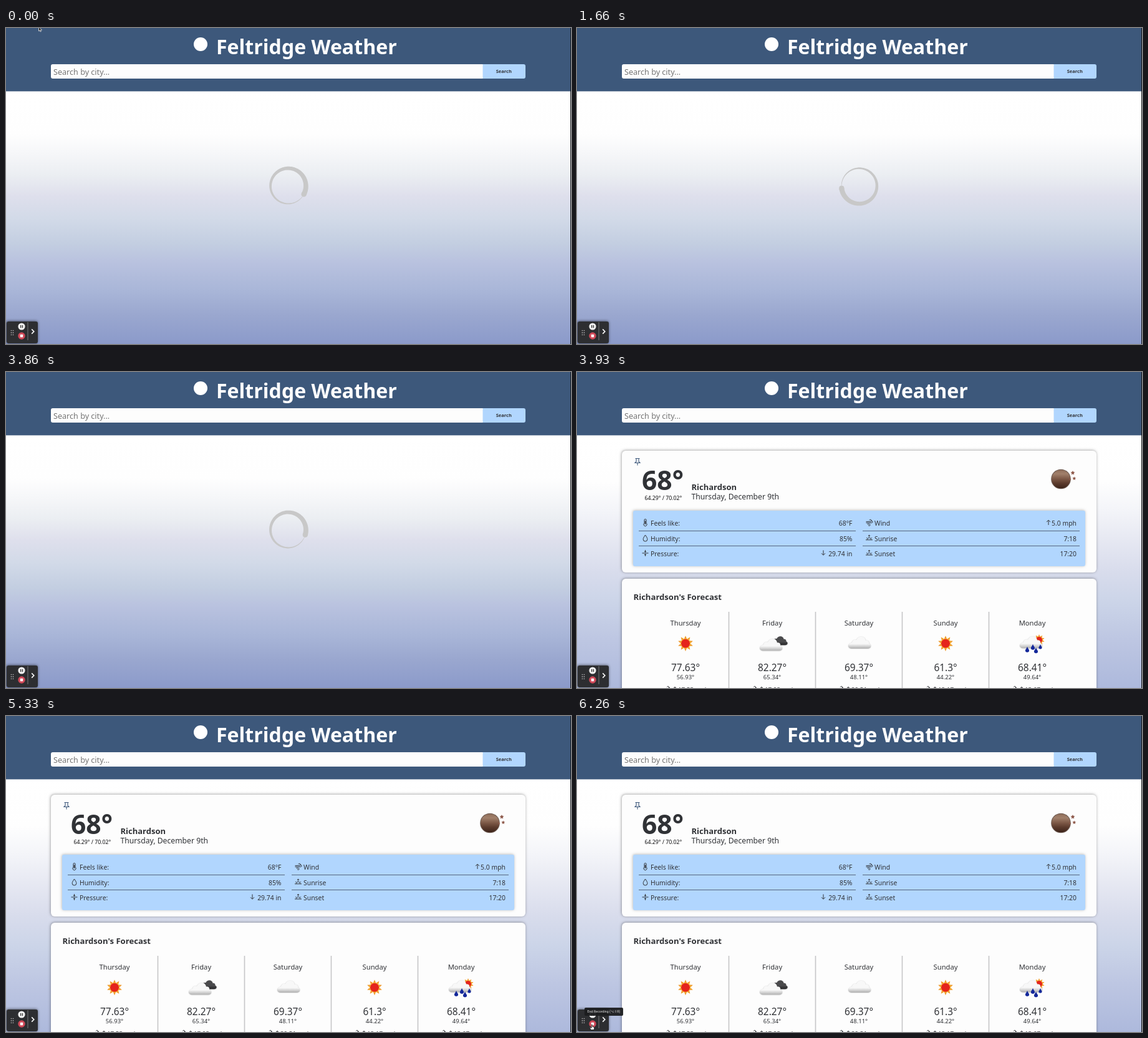
Animation, 906 px wide and 506 px high, one loop 6330 ms. Source, as an HTML page with a canvas:

```html
<!DOCTYPE html>
<html lang="en">
<head>
<meta charset="utf-8">
<title>Weather</title>
<style>
html, body { margin: 0; width: 100%; height: 100%; overflow: hidden; background: #fff; }
canvas { display: block; width: 906px; height: 506px; }
</style>
</head>
<body>
<canvas id="stage" width="906" height="506"></canvas>
<script>
const W = 906, H = 506, LOOP = 6330, FPS = 15, LOADED = 3930;
const c = document.getElementById('stage').getContext('2d');
const SANS = '"Noto Sans", "Open Sans", sans-serif';
const INK = '#303236', BLUE = '#b1d6fe', NAVY = '#3d587b';

function text(str, x, y, size, o = {}) {
  c.font = `${o.bold ? 'bold ' : ''}${size}px ${o.font || SANS}`;
  c.textAlign = o.align || 'left';
  c.fillStyle = o.color || INK;
  c.fillText(str, x, y);
}

function box(x, y, w, h, r, color, shadow) {
  c.save();
  if (shadow) {
    c.shadowColor = `rgba(0,0,0,${shadow})`;
    c.shadowBlur = 4;
    c.shadowOffsetX = -0.5;
    c.shadowOffsetY = -0.5;
  }
  c.fillStyle = color;
  c.beginPath();
  c.roundRect(x, y, w, h, r);
  c.fill();
  c.restore();
}

function disc(x, y, r, color) {
  c.fillStyle = color;
  c.beginPath();
  c.arc(x, y, r, 0, Math.PI * 2);
  c.fill();
}

// Star with n points, inner radius given as a share of r
function star(x, y, r, n, inner, color) {
  c.fillStyle = color;
  c.beginPath();
  for (let i = 0; i < 2 * n; i++) {
    const a = i * Math.PI / n, q = i % 2 ? r * inner : r;
    c.lineTo(x + q * Math.sin(a), y - q * Math.cos(a));
  }
  c.fill();
}

function stroke(d, x, y, color = INK, width = 1) {
  c.save();
  c.translate(x, y);
  c.strokeStyle = color;
  c.lineWidth = width;
  c.stroke(new Path2D(d));
  c.restore();
}

function fill(d, x, y, color, outline) {
  c.save();
  c.translate(x, y);
  const p = new Path2D(d);
  c.fillStyle = color;
  c.fill(p);
  if (outline) {
    c.strokeStyle = outline;
    c.lineWidth = 0.8;
    c.stroke(p);
  }
  c.restore();
}

function vertical(y0, y1, stops) {
  const g = c.createLinearGradient(0, y0, 0, y1);
  for (const [y, color] of stops) g.addColorStop((y - y0) / (y1 - y0), color);
  return g;
}

// Value at t on straight segments through [time, value] points
function track(t, pts) {
  if (t <= pts[0][0]) return pts[0][1];
  for (let i = 1; i < pts.length; i++) {
    const [t0, a] = pts[i - 1], [t1, b] = pts[i];
    if (t <= t1) return a + (b - a) * (t - t0) / (t1 - t0);
  }
  return pts[pts.length - 1][1];
}

const skyEmpty = [[101, '#ffffff'], [170, '#fefefe'], [200, '#f6f7f9'], [235, '#ebeef2'],
  [270, '#dedfec'], [305, '#d2dae8'], [345, '#c3cee1'], [375, '#b9c2df'],
  [420, '#a9b6d8'], [460, '#9aa7cf'], [506, '#8b9aca']];
const skyFull = [[101, '#ffffff'], [175, '#fefefe'], [220, '#f4f5f9'], [270, '#e6e8f2'],
  [320, '#d8dcec'], [370, '#cbd4e8'], [430, '#bdc6e2'], [506, '#adb9dc']];

function page(full) {
  c.fillStyle = vertical(101, H, full ? skyFull : skyEmpty);
  c.fillRect(0, 0, W, H);
  c.fillStyle = NAVY;
  c.fillRect(0, 0, W, 101.4);
  disc(312, 26, 11, '#fff');
  text('Feltridge Weather', 337, 41.5, 32.1, { bold: true, color: '#fff' });
  box(72, 58, 694, 23, [3, 0, 0, 3], '#fdfdfd');
  box(764.5, 58, 68.5, 23, [0, 3, 3, 0], BLUE);
  text('Search by city...', 76, 74.5, 12.6, { color: '#757575' });
  text('Search', 798.3, 72.4, 7.5, { bold: true, align: 'center' });
}

function spinner(deg) {
  const n = 120, R = 28.4, span = Math.PI * 1.96, head = deg * Math.PI / 180;
  const half = i => 0.3 + 3.8 * (1 - i / n);
  const at = (i, r) => c.lineTo(r * Math.cos(head - span * i / n), r * Math.sin(head - span * i / n));
  c.save();
  c.translate(452.5, 253);
  c.fillStyle = '#c8c8c8';
  c.beginPath();
  for (let i = 0; i <= n; i++) at(i, R + half(i));
  for (let i = n; i >= 0; i--) at(i, R - half(i));
  c.fill();
  disc(R * Math.cos(head), R * Math.sin(head), half(0), '#c8c8c8');
  c.restore();
}

function sun(x, y, r) {
  star(x, y, r, 10, 0.6, '#f09c2c');
  disc(x, y, r * 0.64, '#f7b83c');
  disc(x, y, r * 0.56, '#e5241c');
}

// Cloud centred on x, y with a width of 35 at scale 1
function cloud(x, y, s, light, dark) {
  c.save();
  c.translate(x, y);
  c.scale(s, s * 0.9);
  const p = new Path2D('M-13 10 C-20 9 -19 1 -12 0 C-12 -5 -7 -6 -5 -5 C-2 -13 9 -13 10 -4 C14 -5 16 -1 15 1 C20 3 19 10 13 10 Z');
  c.shadowColor = 'rgba(0,0,0,.35)';
  c.shadowBlur = 1.5;
  c.shadowOffsetY = 0.5;
  c.fillStyle = vertical(-11, 10, [[-11, light], [2, light], [10, dark]]);
  c.fill(p);
  c.restore();
}

const whiteCloud = (x, y, s = 1) => cloud(x, y, s, '#f8f8f8', '#b4b4b4');

function drop(x, y, s) {
  fill(`M0 ${-4 * s} C${s} ${-s} ${3 * s} 0 ${2.5 * s} ${2 * s} C${2 * s} ${4 * s} ${-2 * s} ${4 * s} ${-2.5 * s} ${2 * s} C${-3 * s} 0 ${-s} ${-s} 0 ${-4 * s}Z`, x, y, '#14289a');
}

const skies = {
  sun: x => sun(x, 434.7, 12.5),
  clouds(x) {
    cloud(x + 11, 430.5, 0.75, '#4a4a4c', '#242426');
    whiteCloud(x - 2, 437);
  },
  cloud: x => whiteCloud(x + 1, 433.5),
  rain(x) {
    sun(x + 11, 429, 9);
    whiteCloud(x - 2, 433);
    drop(x - 8, 444.5, 1.2);
    drop(x + 1, 440.5, 1.2);
    drop(x + 6, 446, 1.2);
    drop(x + 13, 440, 1);
  }
};

function moon() {
  disc(776, 171.5, 15.8, '#6d5a51');
  disc(776, 171.5, 14.8, vertical(156, 187, [[156, '#8d6c59'], [163, '#a1806b'], [171, '#7d5947'],
    [178, '#5c3b2d'], [187, '#3a2218']]));
  for (const [x, y, r] of [[795, 161.5, 3.6], [790.5, 172, 2], [797.3, 170.5, 3]]) star(x, y, r, 5, 0.5, '#8f5a4c');
}

const WIND = 'M-5 -1.5H2a1.6 1.6 0 1 0 -1.6 -2M-5 .5H4a1.5 1.5 0 1 0 -1.4 -2M-3 2.5H0a1.4 1.4 0 1 1 -1.3 1.6';
const UP = 'M0 4V-3.5M-3 -.8L0 -3.8L3 -.8', DOWN = 'M0 -4V3.5M-3 .8L0 3.8L3 .8';
const HORIZON = 'M-5.5 3.5H5.5M-3 3A3 3 0 0 1 3 3M0 -1.5V-4M-4.5 0L-3.3 1M4.5 0L3.3 1M-1.6 -2.6L0 -4.2L1.6 -2.6';

function today() {
  box(72, 126, 761, 195, 6, '#fdfdfd', 0.38);
  stroke('M-3.5 -5H3.5M-2 -5V0L-4 2H4L2 0V-5M0 2V6', 97, 143.5, NAVY, 1.1);
  text('68°', 104, 189, 42.6, { bold: true });
  text('64.29° / 70.02°', 108.5, 205.3, 8.7, { color: '#0c0c0e' });
  text('Richardson', 183.5, 188.7, 13, { bold: true });
  text('Thursday, December 9th', 183.5, 204.4, 12.2);
  moon();

  box(90, 222, 725, 89, 3, BLUE, 0.28);
  const rows = [['Feels like:', '68°F', 'Wind', '5.0 mph'],
    ['Humidity:', '85%', 'Sunrise', '7:18'],
    ['Pressure:', '29.74 in', 'Sunset', '17:20']];
  rows.forEach(([a, b, d, e], i) => {
    const y = 246.3 + 24.3 * i;
    text(a, 118, y, 10.4);
    text(b, 441.5, y, 10.4, { align: 'right' });
    text(d, 477, y, 10.4);
    text(e, 801, y, 10.4, { align: 'right' });
  });
  c.fillStyle = '#56677c';
  for (const y of [254, 278]) {
    c.fillRect(99, y, 348, 1);
    c.fillRect(458, y, 348, 1);
  }
  stroke('M-1.5 1V-4A1.5 1.5 0 0 1 1.5 -4V1A2.6 2.6 0 1 1 -1.5 1', 109.5, 241);
  stroke('M0 -2.5V3', 109.5, 241, INK, 1.6);
  stroke('M0 -5C2 -2 3.4 0 3.4 1.8A3.4 3.4 0 0 1 -3.4 1.8C-3.4 0 -2 -2 0 -5Z', 109.5, 266);
  stroke('M-5 0H5M0 -5V-1.5M0 5V1.5M-1.6 -3L0 -1.4L1.6 -3M-1.6 3L0 1.4L1.6 3', 109.5, 290);
  stroke(WIND, 468.5, 241);
  stroke(HORIZON, 468.5, 265.3);
  stroke(HORIZON, 468.5, 289.5);
  stroke(UP, 756, 241);
  stroke(DOWN, 395, 289.5);
}

function forecast() {
  box(72, 331, 761, 200, 6, '#fdfdfd', 0.38);
  text("Richardson's Forecast", 90.5, 364.6, 13.1, { bold: true });
  const days = [['Thursday', 'sun', '77.63°', '56.93°', '17.53'],
    ['Friday', 'clouds', '82.27°', '65.34°', '17.02'],
    ['Saturday', 'cloud', '69.37°', '48.11°', '20.51'],
    ['Sunday', 'sun', '61.3°', '44.22°', '12.17'],
    ['Monday', 'rain', '68.41°', '49.64°', '13.67']];
  days.forEach(([day, sky, high, low, wind], i) => {
    const x = 174 + 139 * i, mid = { align: 'center' };
    if (i) {
      c.fillStyle = '#c6c6c8';
      c.fillRect(x - 70.3, 384, 1.6, 122);
    }
    text(day, x, 406, 11.2, mid);
    skies[sky](x);
    text(high, x, 479, 15.4, mid);
    text(low, x, 492, 9.5, mid);
    stroke(WIND, x - 30, 508);
    stroke(UP, x - 17, 508);
    text(wind + ' mph', x - 12, 511.5, 9.8);
  });
}

function recorder() {
  box(1, 470, 50, 35, 3, '#2d2e31', 0.6);
  for (let i = 0; i < 6; i++) disc(8.5 + 3 * (i % 2), 484.5 + 3.4 * (i >> 1), 0.8, '#c4c4c4');
  disc(25, 478, 5.6, '#f2f2f2');
  c.fillStyle = '#333';
  c.fillRect(23, 475.8, 1.3, 4.4);
  c.fillRect(25.8, 475.8, 1.3, 4.4);
  disc(25, 493, 5.7, '#d04858');
  box(22.8, 490.8, 4.4, 4.4, 0.5, '#fff');
  c.fillStyle = '#77787a';
  c.fillRect(34.5, 471, 1, 29);
  stroke('M-1.8 -3.6L1.8 0L-1.8 3.6', 43, 486, '#fff', 1.6);
}

function tip(str, x, y, w, alpha) {
  c.save();
  c.globalAlpha = alpha;
  box(x, y, w, 13, 2, '#1b1c1e');
  text(str, x + w / 2, y + 8.4, 5.3, { align: 'center', color: '#f0f0f0', font: 'Roboto, "DejaVu Sans", sans-serif' });
  c.restore();
}

const arrow = (x, y) => fill('M0 0V7L1.6 5.6L2.7 8L3.8 7.5L2.8 5.2H5Z', x, y, '#222', '#eee');
const hand = (x, y) => fill('M-.8 0Q0 -1 .8 0V3L3.6 3.8Q4 6 3 8H-1.5L-3.6 4.6Q-3 3.6 -.8 5Z', x, y, '#fff', '#222');

function pointer(t) {
  if (t < 1000) arrow(52.5, -2);
  if (t < 5460) return;
  const x = track(t, [[5460, 62], [5740, 25], [5860, 21], [6060, 24]]);
  const y = track(t, [[5460, 150], [5600, 400], [5740, 479], [5860, 486], [6060, 494.5]]);
  if (t < 5730) arrow(x, y);
  else hand(x, y);
}

function draw(t) {
  const full = t >= LOADED;
  page(full);
  if (full) {
    today();
    forecast();
  } else {
    spinner(track(t, [[0, 28], [1667, 172.5], [2933, 292], [3933, 382]]));
  }
  recorder();
  if (t >= 5730 && t < 5950) tip('Pause Recording (⌥⇧P)', 12, 452, 68, track(t, [[5800, 0.9], [5870, 0.75], [5950, 0.2]]));
  if (t >= 5990) tip('End Recording (⌥⇧R)', 12, 467, 62, track(t, [[5990, 0.4], [6100, 0.94]]));
  pointer(t);
  c.fillStyle = '#16181c';
  c.fillRect(905, 0, 1, H);
}

let start;
function tick(now) {
  if (start === undefined) start = now;
  const t = (now - start) % LOOP;
  // The picture steps at 15 per second, on a 10 ms clock
  const step = Math.ceil((Math.floor(t / 10) + 1) * FPS / 100 - 1e-9) - 1;
  draw(step * 1000 / FPS);
  requestAnimationFrame(tick);
}
requestAnimationFrame(tick);
</script>
</body>
</html>
```
